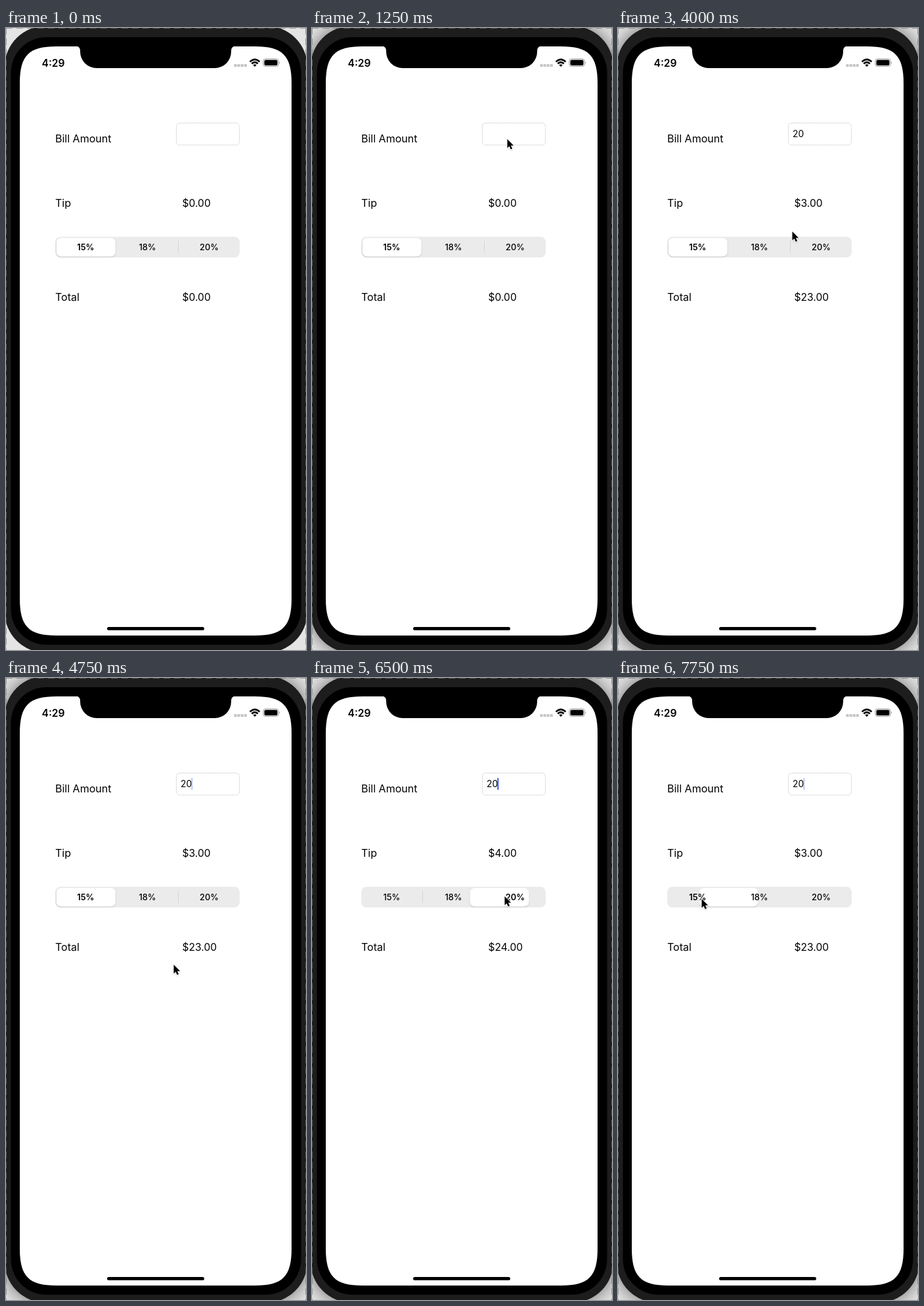
Recreate the animation shown at these times as an HTML page. Size 457 by 946 pixels, loop 8 s.

```html
<!DOCTYPE html>
<html lang="en">
<head>
<meta charset="utf-8">
<title>Tip calculator</title>
<style>
  html, body { margin: 0; width: 100%; height: 100%; overflow: hidden; }
  svg { display: block; width: 457px; height: 946px; font: 16px Inter, "Open Sans", sans-serif; }
  .segments { font-size: 12.8px; font-weight: 500; text-anchor: middle; }
  .value { font-size: 15.6px; }
</style>
</head>
<body>
<svg viewBox="0 0 457 946">
  <defs>
    <filter id="lift" x="-20%" y="-30%" width="140%" height="180%">
      <feDropShadow dx="0" dy="1" stdDeviation="1.2" flood-opacity=".18"/>
    </filter>
    <filter id="glow"><feGaussianBlur stdDeviation="14"/></filter>
  </defs>

  <!-- device -->
  <rect width="457" height="946" fill="#e4e4e4"/>
  <rect id="shadow" x="-2" y="-3" width="461" height="953" rx="62" opacity=".55" filter="url(#glow)"/>
  <rect x="-2" y="-3" width="461" height="953" rx="62" fill="#1d1d1d"/>
  <rect x="7.5" y="14" width="442" height="924" rx="54"/>
  <path d="M.5 0V946M456.5 0V946M0 .5H457" stroke="#777" stroke-opacity=".6" stroke-dasharray="10 6"/>
  <path id="screen" fill="#fff"/>
  <path d="M107 27.5Q113 28 113 35V36A25 25 0 0 0 138 61H318A25 25 0 0 0 343 36V35Q343 28 349 27.5Z"/>
  <rect x="154" y="911" width="148" height="5" rx="2.5"/>

  <!-- status bar -->
  <text x="54.5" y="58.5" font-size="15.6" font-weight="600">4:29</text>
  <path d="M347.5 57h20" stroke="#c4c4c4" stroke-width="4" stroke-dasharray="4 1.1"/>
  <g fill="none" stroke="#000" stroke-width="2.5">
    <path d="M371.6 51.4Q379 44.4 386.4 51.4M374.3 54.2Q379 50 383.7 54.2"/>
    <path d="M376.4 56.2Q379 54.2 381.6 56.2L379 59Z" fill="#000" stroke="none"/>
  </g>
  <rect x="391.9" y="46.9" width="23.2" height="11.6" rx="3.5" fill="none" stroke="#999"/>
  <rect x="393.5" y="48.5" width="20" height="8.4" rx="2"/>
  <path d="M416.3 50.8q2 1.9 0 3.8z" fill="#999"/>

  <!-- form -->
  <text x="75" y="173.5">Bill Amount</text>
  <text x="75" y="271.5">Tip</text>
  <text x="75" y="414.5">Total</text>
  <rect x="259.5" y="144.5" width="96" height="33.5" rx="5" fill="#fff" stroke="#cfcfcf" stroke-dasharray="2 1"/>
  <text id="bill" x="266" y="166" font-size="13.8"></text>
  <rect id="caret" y="152" width="2" height="18" fill="#3b55e6"/>
  <text id="tip" class="value" x="268.5" y="271.5"></text>
  <text id="total" class="value" x="268.5" y="414.5"></text>

  <g class="segments">
    <rect x="75" y="317.5" width="281" height="31.5" rx="8" fill="#ebebeb"/>
    <path id="leftRule" d="M168.5 324V342" stroke="#d4d4d4"/>
    <path id="rightRule" d="M262.5 324V342" stroke="#d4d4d4"/>
    <rect id="thumb" y="319.3" width="89.5" height="28" rx="7" fill="#fff" filter="url(#lift)"/>
    <text x="121.3" y="337.6">15%</text>
    <text x="215.5" y="337.6">18%</text>
    <text x="309.5" y="337.6">20%</text>
  </g>

  <path id="pointer" d="M.5 1V14.6L3.6 11.7L5.7 16.6L8.1 15.6L6 10.8H10.2Z"
        stroke="#fff" stroke-width="1.4" paint-order="stroke" filter="url(#lift)"/>
</svg>

<script>
const LOOP = 8000, STEP = 250, ENTER = 750;
const el = id => document.getElementById(id);
const set = (id, name, value) => el(id).setAttribute(name, value);
const labels = document.querySelectorAll('.segments text');
const rates = [15, 18, 20];

const clamp = k => Math.min(1, Math.max(0, k));
const smooth = k => k * k * (3 - 2 * k);
const easeOut = k => 1 - (1 - k) ** 2;
const mix = (a, b, k) => a + (b - a) * k;

const keys = [{ at: 2250, text: '' }, { at: 2500, text: '2' }, { at: 3250, text: '20' }];
const taps = [{ at: 5350, choice: 1 }, { at: 6300, choice: 2 }, { at: 7550, choice: 0 }];
const glides = [
  { from: ENTER, to: 1250, x: 297, y: 168 },
  { from: 1250, to: 1750, x: 275, y: 182 },
  { from: 3500, to: 4500, x: 255, y: 435 },
  { from: 4750, to: taps[0].at, x: 198, y: 336 },
  { from: 6000, to: taps[1].at, x: 293, y: 331 },
  { from: 7250, to: taps[2].at, x: 127, y: 335 }
];

// Rounded screen whose corners curve in gradually
function screenPath(x, y, w, h, r) {
  const c = r * .755, d = r - c;
  return `M${x} ${y + r}c0 ${-c} ${d} ${-r} ${r} ${-r}h${w - 2 * r}c${c} 0 ${r} ${d} ${r} ${r}` +
    `v${h - 2 * r}c0 ${c} ${-d} ${r} ${-r} ${r}h${2 * r - w}c${-c} 0 ${-r} ${-d} ${-r} ${-r}z`;
}

function pointerAt(t) {
  let x = 322, y = 262;
  for (const g of glides) {
    const k = smooth(clamp((t - g.from) / (g.to - g.from)));
    x = mix(x, g.x, k);
    y = mix(y, g.y, k);
  }
  return [x, y];
}

function thumbAt(t) {
  const place = taps.reduce((p, tap) => mix(p, tap.choice, easeOut(clamp((t - tap.at) / 400))), 0);
  return 77 + 93.6 * place;
}

function draw(t) {
  const latest = list => list.findLast(e => e.at <= t);
  const key = latest(keys);
  const bill = key?.text ?? '';
  const choice = latest(taps)?.choice ?? 0;
  const tip = bill * rates[choice] / 100;
  el('bill').textContent = bill;
  el('tip').textContent = '$' + tip.toFixed(2);
  el('total').textContent = '$' + (+bill + tip).toFixed(2);

  // The blink restarts at every keystroke
  const blink = key ? .5 + .5 * Math.cos(2 * Math.PI * ((t - key.at) / 1000 - .2)) : 0;
  set('caret', 'x', 265.5 + 8.4 * bill.length);
  set('caret', 'opacity', blink);

  const thumbX = thumbAt(t);
  set('thumb', 'x', thumbX);
  set('leftRule', 'opacity', +(thumbX > 230));
  set('rightRule', 'opacity', +(thumbX < 100));
  labels.forEach((label, i) => label.style.fontWeight = i === choice ? 600 : 500);

  const visibility = t < ENTER ? 'hidden' : 'visible';
  set('pointer', 'transform', `translate(${pointerAt(t)})`);
  set('pointer', 'visibility', visibility);
  set('shadow', 'visibility', visibility);
}

set('screen', 'd', screenPath(21, 28, 414, 896, 56));
const start = performance.now();
function frame() {
  const t = (performance.now() - start) % LOOP;
  draw(Math.floor(t / STEP) * STEP);
  requestAnimationFrame(frame);
}
frame();
</script>
</body>
</html>
```
